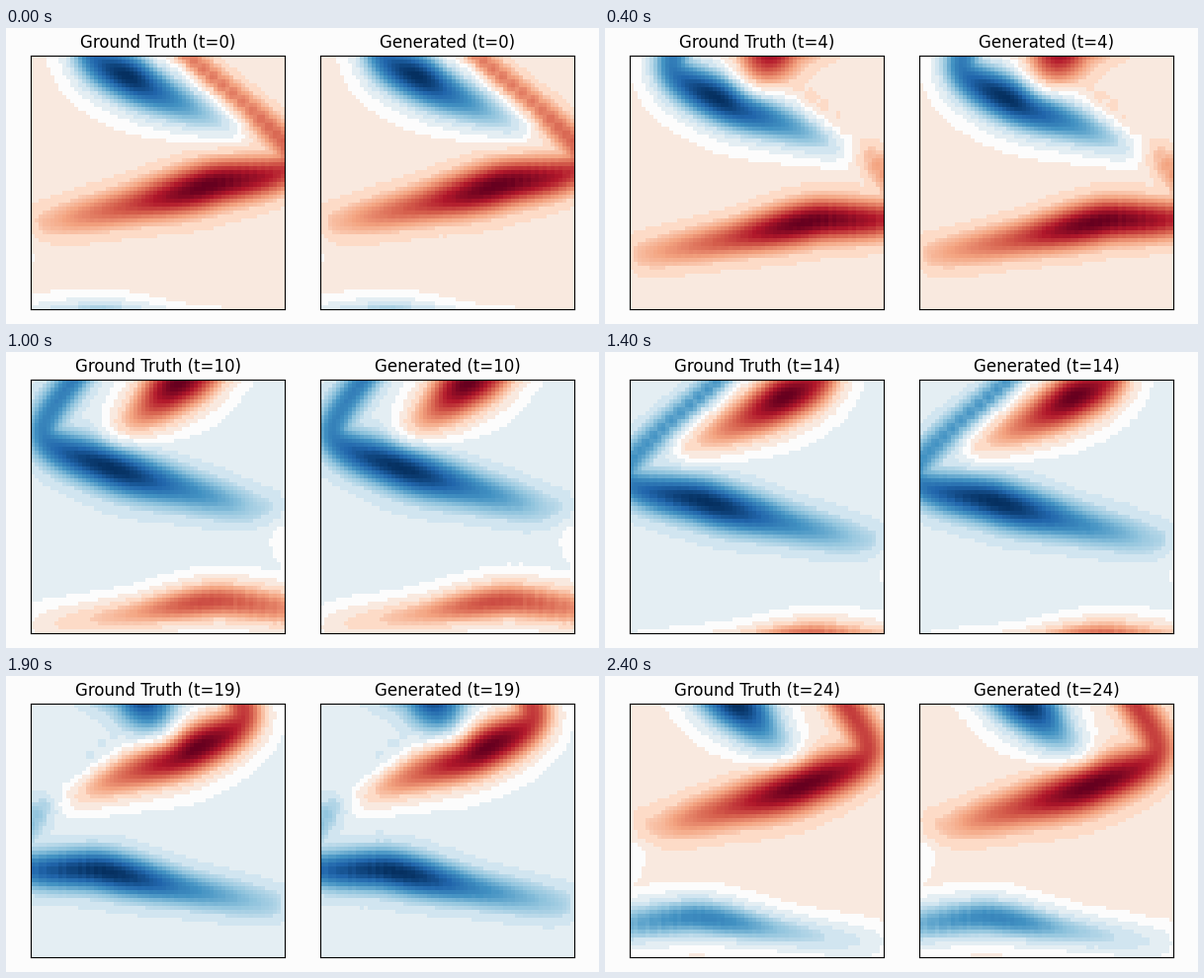
Write a matplotlib script that moves like this. It is 600x300 px and loops after 2500 ms.

```python
import numpy as np
import matplotlib.pyplot as plt
from matplotlib.animation import FuncAnimation
from matplotlib.colors import ListedColormap, to_rgba

W, H = 600, 300
FRAMES, INTERVAL = 25, 100
N, SIDE, LEFT, TOP, GAP = 64, 257, 25, 28, 293
HALF_PERIOD = 14.8
PAPER = "#fcfcfc"

centers = (np.arange(N) + .5) * SIDE / N
GX, GY = np.meshgrid(LEFT + centers, TOP + centers)
MIRROR = 2 * LEFT + SIDE


def sigmoid(x):
    return 1 / (1 + np.exp(-x))


def make_cmap():
    """Red-blue map whose pale middle falls into flat steps."""
    levels = np.linspace(0, 1, 256)
    stepped = np.round(levels / .05) * .05
    pale = np.abs(levels - .5) < .125
    colors = plt.get_cmap("RdBu_r")(np.where(pale, stepped, levels))
    colors[np.abs(levels - .5) < .025] = to_rgba(PAPER)
    return ListedColormap(colors)


def spline(pts, n=14):
    """Catmull-Rom curve through the rows of pts."""
    p = np.vstack([2 * pts[0] - pts[1], pts, 2 * pts[-1] - pts[-2]])
    u = np.linspace(0, 1, n, endpoint=False)[:, None]
    parts = []
    for a, b, c, d in zip(p, p[1:], p[2:], p[3:]):
        parts.append(b + u * (c - a) / 2
                     + u**2 * (a - 2.5 * b + 2 * c - d / 2)
                     + u**3 * (1.5 * (b - c) + (d - a) / 2))
    return np.vstack(parts + [pts[-1:]])


def ridge(s):
    """Crest of a vortex of age s as rows of x, y, strength, width."""
    # the core forms near the top, then drifts down at a steady speed
    cx = 120 - 22 * np.tanh((s - 4) / 9)
    cy = 15 + 54 * np.log1p(np.exp((s - .25) / 5.6))
    # the bend swings outward, the trailing end reaches for the next vortex
    bx = cx - max(2, 36 + 3.3 * s)
    by = cy - 34 * np.exp(-((s - 9) / 12)**2)
    ax = cx - 45 + 80 * sigmoid((s - 12) / 1.5)
    ay = .12 * max(s, 0)**2
    length = 170 * sigmoid((s + 1) / 5)
    drop = 46 - .035 * s * s
    return spline(np.array([
        [ax, ay, .9 * sigmoid((17.5 - s) / 1.8) - .2, np.clip(17 - .5 * s, 10, 18)],
        [bx, by, .8 - .015 * s, min(19, 12 + .4 * abs(s - 16))],
        [cx, cy, 1, 19.5 - .2 * s],
        [cx + .5 * length, cy + .55 * drop, .62, 17 - .17 * s],
        [cx + length, cy + drop, .28, 14],
    ]))


def vortex(s, mirrored):
    gx = MIRROR - GX if mirrored else GX
    out = np.zeros_like(GX)
    for x, y, a, w in ridge(s):
        q = ((gx - x)**2 + (GY - y)**2) / (2 * w * w)
        out = np.maximum(out, a * (np.exp(-q) + .06 * np.exp(-q / 4.4)))
    return out * np.exp(-.014 * s) * sigmoid((s + 11.5) / 2)


def field(t):
    """Blue vortices alternate with mirrored red ones, half a period apart."""
    street = {k: vortex(t + HALF_PERIOD * k, k % 2 == 1) for k in range(-2, 3)}
    blue = np.max([street[k] for k in (-2, 0, 2)], axis=0)
    red = np.max([street[k] for k in (-1, 1)], axis=0)
    return red - blue


def add_panel(left):
    ax = fig.add_axes([left / W, 1 - (TOP + SIDE) / H, SIDE / W, SIDE / H])
    ax.set_xticks([])
    ax.set_yticks([])
    im = ax.imshow(np.zeros((N, N)), cmap=cmap, interpolation="nearest",
                   aspect="auto")
    return im, ax.set_title("", fontsize=12)


plt.rcParams["font.family"] = "DejaVu Sans"
fig = plt.figure(figsize=(W / 100, H / 100), dpi=100, facecolor=PAPER)
cmap = make_cmap()
panels = [("Ground Truth", *add_panel(LEFT)), ("Generated", *add_panel(LEFT + GAP))]


def update(t):
    truth = field(t)
    noise = np.random.default_rng(t).normal(0, .0015, truth.shape)
    for (name, im, title), data in zip(panels, (truth, truth + noise)):
        im.set_data(data)
        im.set_clim(data.min(), data.max())
        title.set_text(f"{name} (t={t})")
    return [a for p in panels for a in p[1:]]


anim = FuncAnimation(fig, update, frames=FRAMES, interval=INTERVAL,
                     init_func=lambda: update(0), repeat=True)
plt.show()
```
